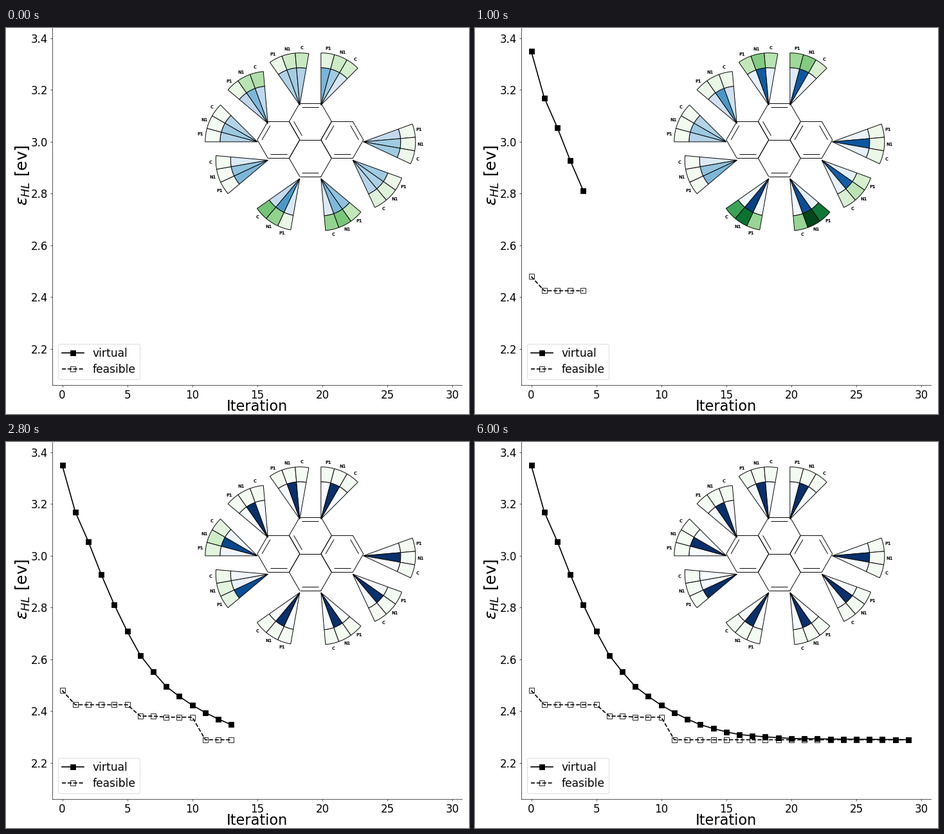
Animation, 720 px wide and 600 px high, one loop 6.2 s. Source, as a matplotlib script:

```python
import numpy as np
import matplotlib.pyplot as plt
from matplotlib.animation import FuncAnimation
from matplotlib.collections import LineCollection
from matplotlib.patches import Wedge

W, H, DPI = 720, 600, 60
FRAMES, STEP_MS = 31, 200
its = np.arange(FRAMES - 1)

# Smooth descent: the root of the distance to the optimum is piecewise linear
BEST = 2.29
root = np.interp(its, (0, 1, 2, 4, 6, 8, 10, 13, 16, 20, 29),
                 (1.029, .938, .875, .722, .571, .453, .365, .241, .141, .07, .02))
VIRTUAL = BEST + root ** 2

# Best value so far: drops at a few steps and holds
drops = (0, 1, 6, 8, 11)
held = np.array((2.480, 2.425, 2.381, 2.377, BEST))
FEASIBLE = held[np.searchsorted(drops, its, side="right") - 1]

LABELS = ("P1", "N1", "C")


class Site:
    """Fan of three choices; one of them wins as the steps go on."""

    def __init__(self, ring, corner, top, share, tilt, peak,
                 delay=0, crest=4, winner=1):
        self.ring, self.corner, self.top = ring, corner, top
        self.share, self.tilt, self.peak = share, tilt, peak
        self.delay, self.crest, self.winner = delay, crest, winner

    def inner(self, k):
        d = max(k - self.delay, 0)
        odds = self.share / (1 - self.share) * np.exp(0.35 * d + 0.02 * d * d)
        p = odds / (1 + odds)
        rest = [(1 - p) * (0.5 + self.tilt), (1 - p) * (0.5 - self.tilt)]
        rest.insert(self.winner, p)
        return rest

    def outer(self, k):
        swell = self.peak * np.exp(-((k - self.crest) / 4.5) ** 2)
        early = np.exp(-k / 2)
        weights = (0.6 + self.tilt - 0.3 * early, 1,
                   0.6 - self.tilt + 0.5 * early)
        return [0.02 + swell * w for w in weights]


SITES = [
    Site("E", 0, 20, .37, -.09, .09),
    Site("N", 5, 90, .37, .25, .46),
    Site("N", 4, 125, .36, 0, .46),
    Site("W", 4, 140, .46, 0, .28, delay=3.5, crest=0),
    Site("W", 3, 180, .38, 0, .22, delay=8, crest=12.5),
    Site("W", 2, 220, .46, .25, .13, delay=9, crest=12.5, winner=0),
    Site("S", 2, 260, .60, -.12, .87),
    Site("S", 1, -40, .45, .25, 1.02),
    Site("E", 1, -20, .33, .05, .29),
]

# --- plot ---
fig = plt.figure(figsize=(W / DPI, H / DPI), dpi=DPI, facecolor="white")
LEFT, RIGHT, BASE = 72.2, 709.4, 554.8
X0, PX_X = 87.5, 20.22
Y22, PX_Y = 499, 402.6
ax = fig.add_axes([LEFT / W, 1 - BASE / H, (RIGHT - LEFT) / W, BASE / H])
ax.set_xlim((LEFT - X0) / PX_X, (RIGHT - X0) / PX_X)
ax.set_ylim(2.2 - (BASE - Y22) / PX_Y, 2.2 + Y22 / PX_Y)
ax.spines[["top", "right"]].set_visible(False)
ax.set_xticks(range(0, 31, 5))
ticks = np.arange(2.2, 3.41, 0.2)
ax.set_yticks(ticks, [f"{v:.1f}" for v in ticks])
ax.tick_params(labelsize=20, pad=5.2)

style = dict(color="black", lw=2, marker="s", ms=10)
virtual, = ax.plot([], [], "-", label="virtual", **style)
feasible, = ax.plot([], [], "--", label="feasible", mfc="none", **style)
ax.legend(loc="lower left", fontsize=20.5, labelspacing=0.4, borderpad=0.37)

# --- molecule, in pixel coordinates ---
mol = fig.add_axes([0, 0, 1, 1])
mol.set_xlim(0, W)
mol.set_ylim(H, 0)
mol.axis("off")

mol.text(390.5, 594.8, "Iteration", fontsize=27, ha="center", va="baseline")
mol.text(34, 228.5, r"$\varepsilon_{HL}$ [ev]", fontsize=30, rotation=90,
         rotation_mode="anchor", ha="center", va="baseline")

BOND = 33
CENTRES = {key: np.array([473.3, 173.9]) + BOND * np.array(d) for key, d in
           {"N": (0, -.75 ** .5), "S": (0, .75 ** .5),
            "W": (-1.5, 0), "E": (1.5, 0)}.items()}
DOUBLE = {"N": (2, 4), "S": (1,), "W": (1, 3), "E": (1, 3, 5)}


def vertex(ring, i, scale=1):
    a = np.radians(60 * i)
    return CENTRES[ring] + scale * BOND * np.array([np.cos(a), np.sin(a)])


def edge(ring, i, scale=1):
    return [vertex(ring, i, scale), vertex(ring, i + 1, scale)]


bonds = [edge(r, i) for r in CENTRES for i in range(6)]
bonds += [edge(r, i, 0.78) for r, ids in DOUBLE.items() for i in ids]
mol.add_collection(LineCollection(bonds, colors="black", linewidths=1.15,
                                  zorder=3))

R_IN, R_OUT, R_TEXT, SPAN = 58, 81, 89, 15


def add_fan(site):
    x, y = vertex(site.ring, site.corner) + (0, 3)
    fan = []
    for j, label in enumerate(LABELS):
        # y points down, so angles change sign
        t = SPAN * j - site.top
        pair = [Wedge((x, y), R_IN, t, t + SPAN),
                Wedge((x, y), R_OUT, t, t + SPAN, width=R_OUT - R_IN)]
        for w in pair:
            w.set(edgecolor="black", linewidth=1.15)
            mol.add_patch(w)
        fan.append(pair)
        mid = np.radians(t + SPAN / 2)
        mol.text(x - 0.5 + R_TEXT * np.cos(mid), y - 0.5 + R_TEXT * np.sin(mid),
                 label, fontsize=8, weight="bold", ha="center",
                 va="center_baseline")
    return fan


fans = [add_fan(site) for site in SITES]


def draw(k):
    virtual.set_data(its[:k], VIRTUAL[:k])
    feasible.set_data(its[:k], FEASIBLE[:k])
    for site, fan in zip(SITES, fans):
        for (inner, outer), p, g in zip(fan, site.inner(k), site.outer(k)):
            inner.set_facecolor(plt.cm.Blues(float(p)))
            outer.set_facecolor(plt.cm.Greens(float(g)))
    return []


anim = FuncAnimation(fig, draw, frames=FRAMES, interval=STEP_MS, repeat=True)
plt.show()
```
